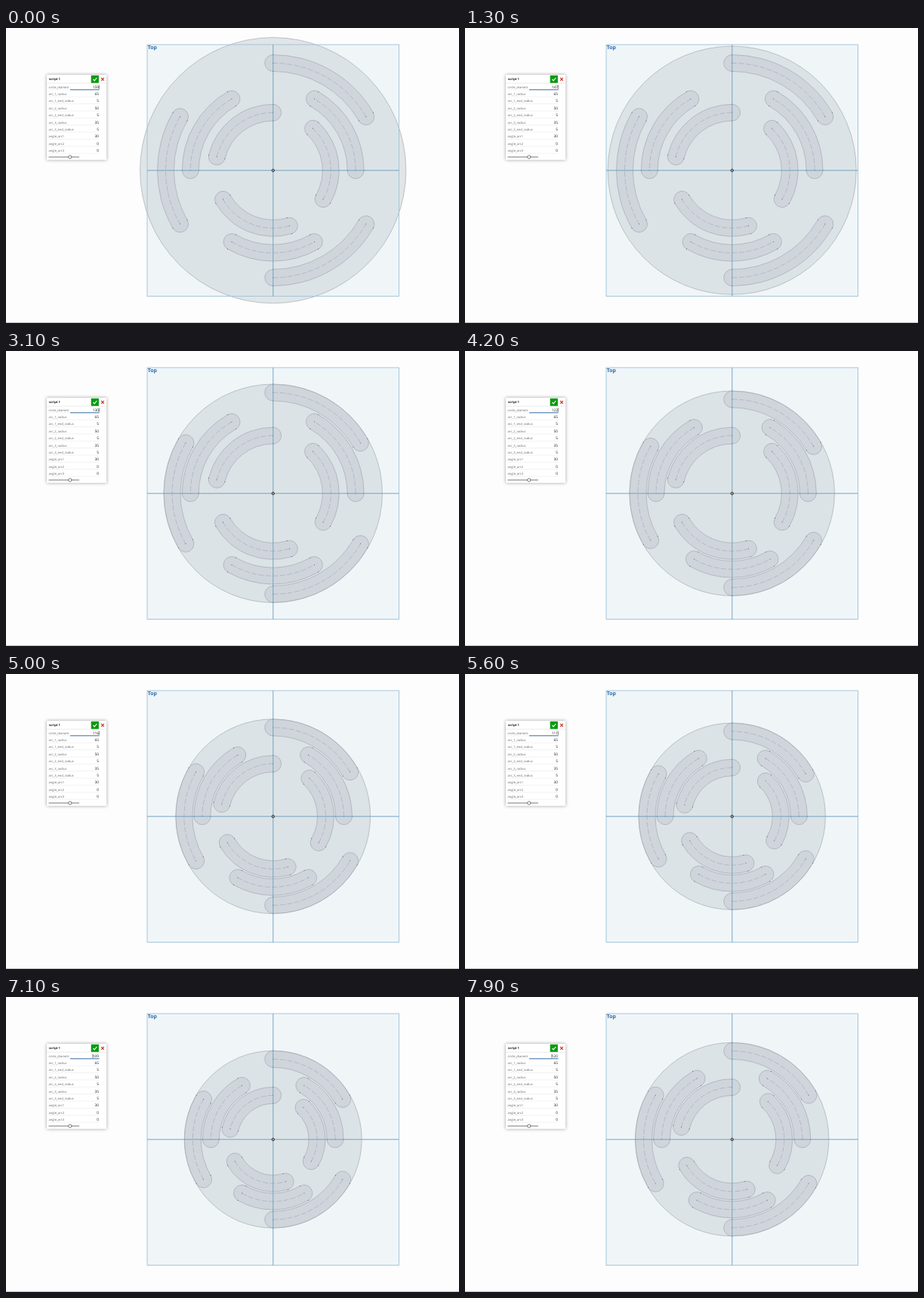
These frames come from a looping animation (600x391 px, 8000 ms). An HTML page:

```html
<!DOCTYPE html>
<html lang="en">
<head>
<meta charset="utf-8">
<title>Parametric sketch</title>
<style>
  html, body { margin: 0; width: 100%; height: 100%; overflow: hidden; background: #fdfdfd; }
  svg { display: block; width: 600px; height: 391px; }
  text { font-family: "Open Sans", sans-serif; font-size: 4.15px; fill: #62666b; text-rendering: geometricPrecision; }
  .value { font-size: 4.8px; fill: #1c1c1c; text-anchor: end; }
  .title { font-weight: 700; fill: #1c1c1c; }
  .plane-name { font-size: 6.9px; font-weight: 700; fill: #2a6aa8; }
  #disc { fill: rgba(212, 219, 222, .69); stroke: #9aa2a6; stroke-width: .6; }
  #slots { fill: #d0d5dc; stroke: #9aa1ab; stroke-width: .6; }
  #mids { fill: none; stroke: #a0a7b5; stroke-width: .6; stroke-dasharray: 7 2.5; }
  #dots { stroke: #4c525b; stroke-width: 1; stroke-linecap: round; }
  .panel { fill: #fff; filter: drop-shadow(0 .8px 2px rgba(0, 0, 0, .38)); }
</style>
</head>
<body>
<svg viewBox="0 0 600 391">
  <rect width="600" height="391" fill="#fdfdfd"/>
  <rect x="187" y="22" width="333.5" height="333.5" fill="#f0f5f8"/>
  <circle id="disc" cx="353.7" cy="188.7"/>
  <path id="slots"/>
  <path id="mids"/>
  <path id="dots"/>
  <rect x="187" y="22" width="333.5" height="333.5" fill="none" stroke="#9cc2d9" stroke-width=".9"/>
  <path d="M187 188.8H520.5M353.8 22V355.5" stroke="#699cbd" stroke-width=".9"/>
  <circle cx="353.8" cy="188.8" r="1.7" fill="#9aa2a6" stroke="#2a2a2a" stroke-width=".9"/>
  <text class="plane-name" x="187.8" y="28.2">Top</text>
  <path d="M0 390.5H600" stroke="#c2c2c2"/>

  <rect class="panel" x="54" y="62" width="79.2" height="112.8"/>
  <path d="M54 73.2H133" stroke="#dedede" stroke-width=".6"/>
  <text class="title" x="56.8" y="69.4">script 1</text>
  <rect x="112.7" y="62.8" width="10.2" height="10" fill="#079a0d"/>
  <path d="M115.5 68L117.2 69.8L120.3 66" fill="none" stroke="#fff" stroke-width="1.1"/>
  <path d="M126.2 66L129.8 69.8M129.8 66L126.2 69.8" stroke="#d13a2c" stroke-width="1.2"/>
  <g id="rows"></g>
  <path d="M85 81.8H123.6" stroke="#3a74a8"/>
  <path id="caret" d="M0 75.6V80.8" stroke="#222" stroke-width=".6"/>
  <path d="M56.5 171H97" stroke="#555" stroke-width=".8"/>
  <circle cx="84.8" cy="171" r="2.1" fill="#fff" stroke="#444" stroke-width=".7"/>
  <path id="ibeam" d="M106.8 75.8H109.2M108 75.8V81.2M106.8 81.2H109.2" stroke="#222" stroke-width=".7"/>
</svg>
<script>
const LOOP = 8000, STEP = 100, LEAD = 250, SCALE = 2.188;
const CX = 353.7, CY = 188.7, CAP = 5 * SCALE, GAP = 24;
const $ = id => document.getElementById(id);

const rows = {
  circle_diametr: 159, arc_1_radius: 65, arc_1_end_radius: 5, arc_2_radius: 50, arc_2_end_radius: 5,
  arc_3_radius: 35, arc_3_end_radius: 5, angle_arc1: 30, angle_arc2: 0, angle_arc3: 0
};
$("rows").innerHTML = Object.entries(rows).map(([label, value], i) => {
  const y = 79.7 + i * 9.37;
  return `<path d="M56.5 ${y + 2.1}H123.6" stroke="#e4e4e4" stroke-width=".5"/>` +
    `<text x="56.5" y="${y}">${label}</text><text class="value" x="123" y="${y}">${value}</text>`;
}).join("");
const field = document.querySelector(".value");

// Time and drawn diameter; the typed value runs ahead of the drawing by LEAD
const keys = [
  [0, 161], [1300, 150.4], [1900, 143], [3100, 132.3], [4200, 124.1], [5600, 113.1],
  [6500, 105.1], [6800, 105.6], [7800, 111.5], [7900, 117.2], [8200, 120.4]
];

function diameterAt(time) {
  const next = keys.findIndex(key => key[0] > time);
  const [t0, d0] = keys[next - 1], [t1, d1] = keys[next];
  return d0 + (d1 - d0) * (time - t0) / (t1 - t0);
}

function at(radius, degrees) {
  const a = degrees * Math.PI / 180;
  return `${(CX + radius * Math.cos(a)).toFixed(2)} ${(CY - radius * Math.sin(a)).toFixed(2)}`;
}
const arc = (radius, sweep, end) => `A${radius} ${radius} 0 0 ${sweep} ${end}`;

function slot(r, from, to) {
  const outer = r + CAP, inner = r - CAP;
  return `M${at(outer, from)}` + arc(outer, 0, at(outer, to)) + arc(CAP, 0, at(inner, to)) +
    arc(inner, 1, at(inner, from)) + arc(CAP, 0, at(outer, from)) + "Z";
}

function draw(now) {
  const time = Math.floor(now / STEP) * STEP;
  const R = diameterAt(time) / 2 * SCALE;
  // Each ring is pushed inwards by the one outside it
  const r1 = Math.min(65 * SCALE, R - 11.1);
  const r2 = Math.min(50 * SCALE, r1 - GAP);
  const r3 = Math.min(35 * SCALE, r2 - GAP);
  let slots = "", mids = "", dots = "";
  for (const [r, start, span] of [[r1, 30, 60], [r2, 0, 60], [r3, -30, 76.5]]) {
    for (let turn = 0; turn < 360; turn += 120) {
      const from = start + turn, to = from + span;
      slots += slot(r, from, to);
      mids += `M${at(r, from)}` + arc(r, 0, at(r, to));
      for (const end of [from, to])
        for (const offset of [-CAP, 0, CAP]) dots += `M${at(r + offset, end)}h.01`;
    }
  }
  $("disc").setAttribute("r", R);
  $("slots").setAttribute("d", slots);
  $("mids").setAttribute("d", mids);
  $("dots").setAttribute("d", dots);
  field.textContent = Math.round(diameterAt(time + LEAD));
  $("caret").setAttribute("transform", `translate(${time < 6400 ? 123.3 : 114.9})`);
  $("ibeam").style.display = time >= 6400 && time < 6600 ? "" : "none";
}

const begin = performance.now();
function tick() {
  draw((performance.now() - begin) % LOOP);
  requestAnimationFrame(tick);
}
tick();
</script>
</body>
</html>
```
